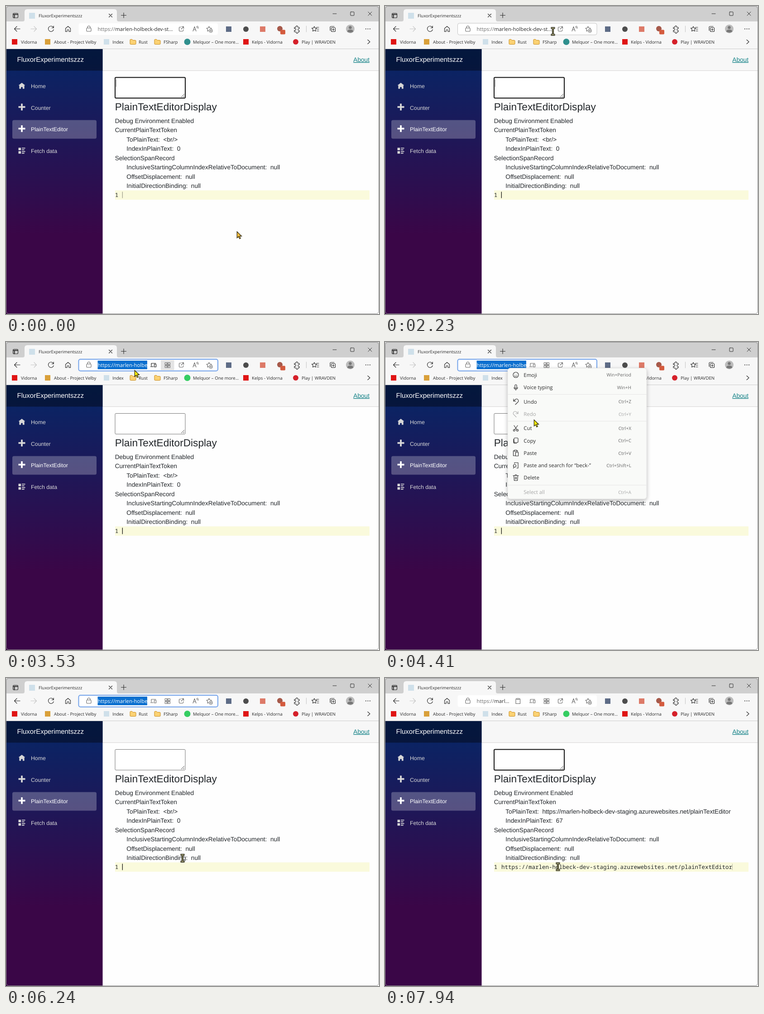
An HTML page for the animation above (8000 ms loop, 824 by 679 pixels).

```html
<!DOCTYPE html>
<html lang="en">
<head>
<meta charset="utf-8">
<title>FluxorExperimentszzz</title>
<style>
html, body { margin: 0; width: 100%; height: 100%; overflow: hidden; background: #fefefe; }
svg { display: block; font: 13.65px "Liberation Sans", sans-serif; text-rendering: geometricPrecision; }
.ui { font-family: "Open Sans", "Noto Sans", sans-serif; fill: #2b2b2b; }
.small { font-size: 9.7px; }
.icon { fill: none; stroke: #303030; stroke-width: 1.15; stroke-linecap: round; stroke-linejoin: round; }
.soft { stroke: #6a6a6a; }
.page { fill: #212529; }
.nav { font-size: 12.29px; fill: #d7d7d7; }
.mono { font: 12.5px "Noto Sans Mono", monospace; fill: #212529; }
</style>
</head>
<body>
<svg width="824" height="679" viewBox="0 0 824 679">
  <defs>
    <linearGradient id="side" x2="0" y2="1">
      <stop stop-color="#052767"/><stop offset=".7" stop-color="#3a0647"/>
    </linearGradient>
    <filter id="shadow" x="-10%" y="-10%" width="120%" height="125%">
      <feDropShadow dx="0" dy="3" stdDeviation="4" flood-opacity=".28"/>
    </filter>
    <path id="folder" d="M.5 2.5q0-1.5 1.5-1.5h3l2 2h5q1.5 0 1.5 1.5v6q0 1.5-1.5 1.5h-10q-1.5 0-1.5-1.5z" fill="#fbd273" stroke="#c98b1c"/>
    <path id="plus" d="M3 0v3h-3v2h3v3h2v-3h3v-2h-3v-3z"/>
  </defs>

  <!-- window frame, tab and toolbar -->
  <rect width="824" height="35" fill="#cfcfcf"/>
  <rect y="34" width="824" height="60" fill="#f7f7f7"/>
  <path d="M37 34q4 0 4-4V13q0-6 6-6H239q6 0 6 6V30q0 4 4 4z" fill="#f7f7f7"/>
  <path d="M0 94.5H824" stroke="#cdcdcd"/>
  <rect x="51" y="15" width="13" height="13" fill="#cfe0ea"/>
  <text class="ui" x="72" y="24.5" font-size="9.5">FluxorExperimentszzz</text>
  <g class="icon">
    <rect x="15.5" y="16" width="11" height="10" rx="2"/><path d="M16 18.5h10M18.5 19v7" stroke-width="2"/>
    <path d="M227.5 17.5l7 7m0-7l-7 7M254.5 20.5h11M260 15v11"/>
    <path d="M722 17h8M800 13l8 8m0-8l-8 8" stroke-width="1"/><rect x="761" y="13" width="8" height="8" rx="1" stroke-width="1"/>
    <path d="M31 50.5H18.5m5.5-5.5l-5.5 5.5 5.5 5.5"/>
    <path d="M55 50.5h12.5m-5.5-5.5l5.5 5.5-5.5 5.5" stroke="#c6c6c6"/>
    <path d="M105 48a6 6 0 1 0 .2 4M105.200 44v4.200h-4.200"/>
    <path d="M131.500 49.5l5.500-4.800 5.500 4.800v7h-3.500v-4h-4v4h-3.500z"/>
    <path d="M799 74.5l5 4.5-5 4.5"/>
    <path d="M637 47h3.500a2.200 2.200 0 1 1 4 0h3.500v3a2.200 2.200 0 1 0 0 4v3h-3a2.200 2.200 0 1 1-4 0h-4v-3.500a2.200 2.200 0 1 0 0-3.500z"/>
    <path d="M663.5 44v13" stroke="#c9c9c9"/>
    <path d="M681 45l1.700 3.400 3.800.5-2.700 2.700.6 3.900-3.400-1.800-3.400 1.800.6-3.900-2.700-2.700 3.800-.5zM686 47h5M687 51h4M687 55h4"/>
    <rect x="718.5" y="47.5" width="9" height="9" rx="2"/><path d="M716 54v-7q0-2 2-2h7M723 49.5v5M720.5 52h5"/>
  </g>
  <circle cx="760.5" cy="50.5" r="9.5" fill="#bcbcbc"/><circle cx="760.5" cy="47.5" r="3.3" fill="#777"/><path d="M754 56.5q0-4.5 6.500-4.500t6.500 4.500q-6.500 4-13 0z" fill="#777"/>
  <path d="M795 50.5h.1M799.5 50.5h.1M804 50.5h.1" stroke="#303030" stroke-width="2" stroke-linecap="round"/>
  <rect x="486" y="45" width="12" height="12" fill="#5d6b86"/>
  <circle cx="530" cy="51" r="6" fill="#4c4c4c"/>
  <rect x="561" y="45" width="12" height="12" fill="#dd7a68"/>
  <circle cx="605" cy="50" r="6" fill="#a6594a"/><rect x="606" y="52.5" width="11" height="10" rx="2" fill="#d45b3e"/>

  <!-- bookmarks -->
  <rect x="13" y="73" width="12" height="12" fill="#e01414"/>
  <rect x="86" y="73" width="12" height="12" fill="#d9a03a"/>
  <rect x="216" y="73" width="12" height="12" fill="#cfe0ea"/>
  <use href="#folder" x="273.5" y="72.5"/><use href="#folder" x="327.5" y="72.5"/>
  <circle id="music" cx="400.5" cy="79" r="7"/>
  <rect x="524" y="73" width="12" height="12" fill="#e01414"/>
  <circle cx="640" cy="79" r="6" fill="#d5202a"/>
  <g class="ui small" id="bookmarks"></g>

  <!-- address bar -->
  <rect id="bar" x="160.5" y="38" width="307.5" height="25.7" rx="4" fill="#fff"/>
  <rect id="qrHover" x="342" y="40" width="29.5" height="22" fill="#e4e4e4"/>
  <rect id="selection" x="202.5" y="41" width="109.5" height="19" fill="#0b70cf"/>
  <text class="ui" x="202.5" y="54.6" font-size="11.35"><tspan id="scheme">https://</tspan><tspan id="host"></tspan></text>
  <path id="urlCaret" d="M202.5 42v17" stroke="#333"/>
  <g class="icon soft">
    <rect x="178" y="48.5" width="10" height="7.5" rx="1.5"/><path d="M180 48v-1a3 3 0 0 1 6 0v1M183 52h.1"/>
    <path d="M386 46.5h-2q-1.5 0-1.5 1.5v6q0 1.5 1.5 1.5h6q1.5 0 1.5-1.5v-2M388 45.5h4.5v4.5M392 46l-5 5"/>
    <path d="M413 55.5l3.5-10 3.5 10M414 52h5M421 45q1.5 1.5 1 3.5M423.200 44q2 2.5 1.200 5.5"/>
    <path d="M453 50l1-1-3.700-.5-1.800-3.500-1.800 3.500-3.700.5 2.700 2.700-.6 3.800 2.500-1.200"/><circle cx="452.5" cy="54.5" r="3.5"/><path d="M452.5 53v3M451 54.5h3"/>
    <g id="extra"><path id="device" d="M321 53v-6h10M319.5 54.5h6M327.5 49h4v6h-4z"/>
      <path d="M351.5 45.5h4v4h-4zM358.5 45.5h4v4h-4zM351.5 52.5h4v4h-4zM358.5 52.5h4v4h-4zM357 45v12M351 51h12" stroke-width="1"/></g>
    <path id="clip" d="M291.5 46h-2.5v10.5h9.5V46h-2.5M291.5 45h4.5v2.5h-4.5z"/>
  </g>

  <!-- page -->
  <rect x="213" y="95" width="611" height="47" fill="#f7f7f7"/><path d="M213 142.5H824" stroke="#d6d5d5"/>
  <rect y="95" width="213.5" height="584" fill="url(#side)"/>
  <rect y="95" width="213.5" height="47.5" opacity=".4"/>
  <rect x="14" y="251.5" width="186" height="41" rx="3.5" fill="#fff" opacity=".25"/>
  <text x="24.5" y="123" font-size="15" fill="#fff">FluxorExperimentszzz</text>
  <g class="nav">
    <text x="55" y="180.8">Home</text><text x="55" y="228.5">Counter</text>
    <text x="55" y="276.2" fill="#fff">PlainTextEditor</text><text x="55" y="323.9">Fetch data</text>
    <path transform="translate(27.5 169.3) scale(1.87)" d="M4 0l-4 3h1v4h2v-2h2v2h2v-4h1z"/>
    <use href="#plus" transform="translate(27.5 215.2) scale(1.87)"/>
    <use href="#plus" transform="translate(27.5 262.9) scale(1.87)" fill="#fff"/>
    <path transform="translate(27.5 312.4) scale(1.87)" d="M0 0h3v3h-3zM4 0h4v1h-4zM4 2h3v1h-3zM0 4h3v3h-3zM4 4h4v1h-4zM4 6h3v1h-3z"/>
  </g>
  <text x="767.3" y="122.8" fill="#178388" text-decoration="underline">About</text>
  <rect id="area" x="241" y="157.5" width="155" height="45.5" rx="2" fill="#fff"/>
  <path d="M387 201l7-7M391 201l3-3" stroke="#444"/>
  <path id="areaCaret" d="M243.5 162v16" stroke="#777"/>
  <text class="page" x="240.7" y="230" font-size="22.65">PlainTextEditorDisplay</text>
  <g class="page" id="debug"></g>
  <rect x="241" y="406.5" width="562" height="20.5" fill="#fafadc"/>
  <text class="mono" x="240.7" y="421.3">1</text><text class="mono" id="typed" x="257" y="421.3"></text>
  <path id="caret" d="M0 409.5v14" stroke="#111" stroke-width="1.3"/>

  <!-- context menu -->
  <g id="menu" class="ui">
    <rect x="271" y="57.5" width="307" height="288.5" rx="6" fill="#f9faf8" stroke="#d5d5d5" stroke-width=".6" filter="url(#shadow)"/>
    <rect id="hover" x="274.5" width="300" height="26" rx="3" fill="#ececec"/>
    <path d="M271 115.5H578M271 174.5H578M271 315.5H578" stroke="#e6e6e6"/>
  </g>

  <rect x=".5" y=".5" width="823" height="678" rx="6" fill="none" stroke="#8d8d8d"/>
  <g id="pointer">
    <circle id="press" r="9.5" fill="#e2452f"/>
    <g id="beam" fill="none"><path d="M-4.500-7.500h9M0-7.500v15M-4.500 7.500h9" stroke="#1d1d10" stroke-width="4"/><path d="M-3.700-7.500h7.400M0-7.500v15M-3.700 7.500h7.400" stroke="#e9e3a8" stroke-width="1"/></g>
    <path id="arrow" d="M.3.5v13.800l3.300-3 2.400 5 2.300-1.100-2.300-4.800h4.500z" stroke="#26220a" stroke-width="1.2"/>
  </g>
</svg>
<script>
const LOOP = 8000;
const ADDRESS = "https://marlen-holbeck-dev-staging.azurewebsites.net/plainTextEditor";
const el = id => document.getElementById(id);
const show = (id, on) => el(id).setAttribute("opacity", +on);
const set = (id, attrs) => { for (const k in attrs) el(id).setAttribute(k, attrs[k]); };
const write = (id, text) => { if (el(id).textContent !== text) el(id).textContent = text; };
const clamp = v => Math.max(0, Math.min(1, v));
const field = (name, value) => `${name}:\u00a0\u00a0${value}`;

el("bookmarks").innerHTML = [[33, "Vidorna"], [106, "About - Project Velby"], [235, "Index"], [293, "Rust"],
  [348, "FSharp"], [413, "Melquor – One more..."], [543, "Kelps - Vidorna"], [653, "Play | WRAVDEN"]]
  .map(([x, s]) => `<text x="${x}" y="82.5">${s}</text>`).join("");

// lines that hold a field are indented
const lines = ["Debug Environment Enabled", "CurrentPlainTextToken", field("ToPlainText", ""),
  field("IndexInPlainText", ""), "SelectionSpanRecord",
  field("InclusiveStartingColumnIndexRelativeToDocument", "null"), field("OffsetDisplacement", "null"),
  field("InitialDirectionBinding", "null")];
el("debug").innerHTML = lines.map((s, i) =>
  `<text id="line${i}" x="${s.includes(":") ? 266.3 : 240.7}" y="${257.7 + 20.48 * i}">${s}</text>`).join("");

// centre y, label, shortcut, icon path around the origin, disabled
const items = [
  [72.5, "Emoji", "Win+Period", "M-6 0a6 6 0 1 0 12 0a6 6 0 1 0-12 0M-2-1.5h.1M2-1.5h.1M-3 1.5q3 3.5 6 0"],
  [100, "Voice typing", "Win+H", "M-2-4a2 2 0 0 1 4 0v4a2 2 0 0 1-4 0zM-4 0q0 4 4 4t4-4M0 4v2.5"],
  [131.5, "Undo", "Ctrl+Z", "M-5-6v5h5M-5-1l4-4q4-2.5 6 1t-1 5.5l-5 5"],
  [159, "Redo", "Ctrl+Y", "M5-6v5h-5M5-1l-4-4q-4-2.5-6 1t1 5.5l5 5", true],
  [190, "Cut", "Ctrl+X", "M-4-6l6.5 9.5M4-6l-6.5 9.5M-5.5 4.5a2 2 0 1 0 4 0a2 2 0 1 0-4 0M1.5 4.5a2 2 0 1 0 4 0a2 2 0 1 0-4 0"],
  [217.5, "Copy", "Ctrl+C", "M-2-6h5q2 0 2 2v6q0 2-2 2h-5q-2 0-2-2v-6q0-2 2-2M-5-3v6q0 3 3 3h4"],
  [244.7, "Paste", "Ctrl+V", "M-3-5h-2.5V6H-1M2-5h2v2M-3-6.5h5v3h-5zM-.5-1.5h6V6.5h-6z"],
  [272, "Paste and search for “beck-”", "Ctrl+Shift+L", "M-3-4v-2h8V6H2M-5.5 1a3 3 0 1 0 6 0a3 3 0 1 0-6 0M-4 4l-1.5 2.5"],
  [299, "Delete", "", "M-6-4.5H6M-2-4.5q0-2 2-2t2 2M-4.5-4.5l1 11h7l1-11M-1.3-1.5v5M1.3-1.5v5"],
  [331, "Select all", "Ctrl+A", "", true]];
el("menu").insertAdjacentHTML("beforeend", items.map(([y, label, keys, icon, off]) =>
  `<g ${off ? 'fill="#a6a6a6"' : ""}><path class="icon" d="${icon}" transform="translate(289 ${y})" ${off ? 'style="stroke:#b0b0b0"' : ""}/>
  <text x="306.3" y="${y + 4.1}" font-size="11.45">${label}</text>
  <text x="544" y="${y + 3.8}" font-size="10.1" text-anchor="end" ${off ? "" : 'fill="#686868"'}>${keys}</text></g>`).join(""));

// pointer path: time, x, y
const path = [[0, 510, 497], [560, 510, 497], [700, 508, 478], [900, 480, 370], [1130, 430, 240], [1360, 394, 158],
  [1570, 380, 98], [1720, 373, 62], [1850, 371, 56], [2240, 371, 56], [2490, 350, 55], [3320, 350, 55],
  [3530, 284, 62], [3750, 271, 58], [4190, 271, 58], [4270, 329, 166], [4410, 329, 171], [4800, 338, 196],
  [5160, 345, 212], [5440, 351, 214], [5980, 351, 214], [6240, 390, 397], [6400, 386, 429], [6630, 382, 425],
  [7640, 382, 425], [7900, 382, 416], [LOOP, 382, 416]];
function pointerAt(t) {
  const i = path.findIndex(p => p[0] > t), [t0, x0, y0] = path[i - 1], [t1, x1, y1] = path[i];
  const k = (t - t0) / (t1 - t0);
  return [x0 + (x1 - x0) * k, y0 + (y1 - y0) * k];
}

function draw(now) {
  const t = now % LOOP, within = (a, b) => t >= a && t < b;
  const focused = within(2760, 6900), selected = within(2900, 6900), pasted = t >= 7700;
  const hovered = within(1700, 2760);

  // address bar
  set("bar", { stroke: focused ? "#74a3ea" : hovered ? "#c4c4c4" : "none", "stroke-width": focused ? 2 : 1 });
  write("host", t < 2760 ? "marlen-holbeck-dev-st..." : focused ? "marlen-holbe" : pasted ? "marl..." : "marlen-ho...");
  set("scheme", { fill: selected ? "#fff" : "#6c6c6c" });
  set("host", { fill: selected ? "#fff" : "#2b2b2b" });
  show("selection", selected);
  show("urlCaret", focused && !selected);
  show("extra", t >= 2760);
  show("clip", pasted);
  show("qrHover", within(2900, 3800));
  el("device").style.stroke = within(2900, 3800) ? "#111" : "";
  set("music", { fill: t < 3250 ? "#2f8f8d" : "#35cd62" });

  // editor
  set("area", focused ? { stroke: "#767676", "stroke-width": 1 } : { stroke: "#111", "stroke-width": 2 });
  show("areaCaret", t < 2760 ? 1 - clamp(((t + 450) % 1110 - 450) / 150) : within(6930, 7450) || within(7700, 7860));
  const phase = (t + 40) % 1000;
  show("caret", clamp(.1 + Math.min(phase, 1000 - phase) / 140));
  set("caret", { transform: `translate(${pasted ? 767.3 : 257.3})` });
  write("typed", pasted ? ADDRESS : "");
  write("line2", field("ToPlainText", pasted ? ADDRESS : "<br/>"));
  write("line3", field("IndexInPlainText", pasted ? ADDRESS.length - 1 : 0));

  // pointer and menu
  const [x, y] = pointerAt(t);
  set("pointer", { transform: `translate(${x} ${y})` });
  const beam = within(1720, 3400) || t >= 5800;
  show("beam", beam);
  show("arrow", !beam);
  set("arrow", { fill: t < 340 ? "#fbbd3c" : "#f8ee0c" });
  const press = start => t < start ? 0 : clamp((start + 260 - t) / 120);
  show("press", press(2760) || press(6880));
  show("menu", clamp((t - 3830) / 100) * clamp((5840 - t) / 140));
  const item = items.find(([cy]) => y > 177 && Math.abs(cy - y) < 13.5);
  show("hover", item ? 1 : 0);
  if (item) set("hover", { y: item[0] - 13 });
}

function frame() {
  draw(performance.now());
  requestAnimationFrame(frame);
}
frame();
</script>
</body>
</html>
```
